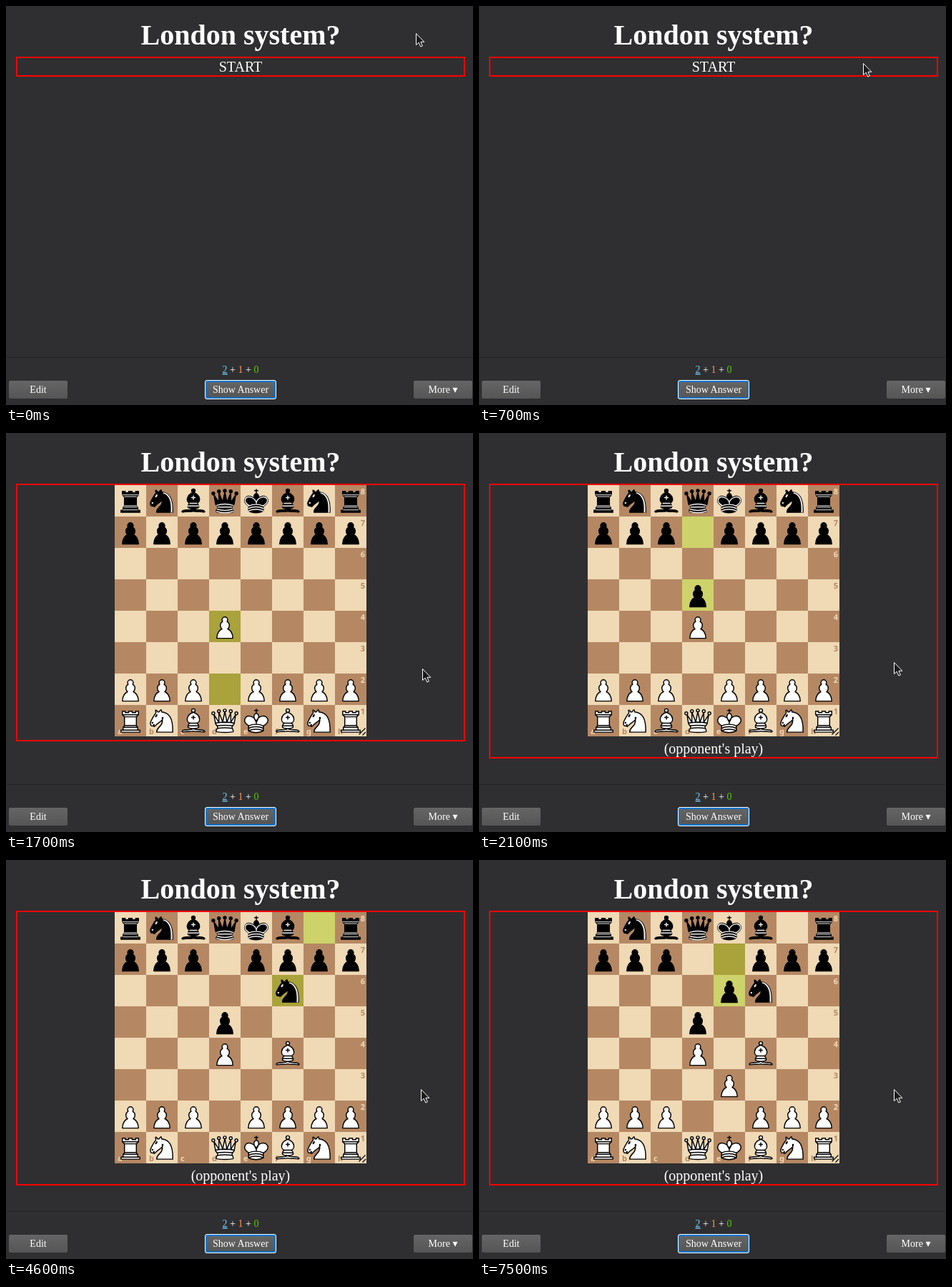
An HTML page that plays this animation: 653x559 px, repeating every 8 s.

```html
<!DOCTYPE html>
<html lang="en">
<head>
<meta charset="utf-8">
<title>Opening flashcard</title>
<style>
  html, body { margin: 0; width: 100%; height: 100%; overflow: hidden; background: #2f2f31; }
  svg { display: block; }
  text { font-family: "Liberation Serif", "DejaVu Sans", serif; fill: #fff; text-anchor: middle; white-space: pre; }
  .title { font-size: 40px; font-weight: bold; }
  .body { font-size: 20px; }
  .small { font-size: 14px; }
  .coord { font: bold 11px "Noto Sans", sans-serif; }
  .piece { stroke: #000; stroke-width: 1.5; stroke-linecap: round; stroke-linejoin: round; }
</style>
</head>
<body>
<svg id="stage" width="653" height="559" viewBox="0 0 653 559">
  <defs>
    <linearGradient id="face" x1="0" y1="0" x2="0" y2="1">
      <stop offset="0" stop-color="#656565"/><stop offset="1" stop-color="#555"/>
    </linearGradient>
  </defs>
  <rect width="653" height="559" fill="#2f2f31"/>
  <text class="title" x="328" y="54">London system?</text>
  <text class="body" id="start" x="328" y="92">START</text>
  <g id="board"></g>
  <text class="body" id="caption" x="328" y="449">(opponent's play)</text>
  <rect id="box" x="15" y="72" width="626" height="26" fill="none" stroke="#f00" stroke-width="2"/>

  <rect y="492" width="653" height="1" fill="#252527"/>
  <text class="small" x="328" y="514"><tspan fill="#7cf" text-decoration="underline">2</tspan> + <tspan fill="#ff935b">1</tspan> + <tspan fill="#5c0">0</tspan></text>
  <g fill="url(#face)">
    <rect x="4" y="525" width="82" height="25" rx="2"/>
    <rect x="570" y="525" width="82" height="25" rx="2"/>
    <rect x="278" y="524" width="100" height="27" rx="3.5" fill="#fff"/>
    <rect x="279" y="525" width="98" height="25" rx="2.5" fill="#0b75d1"/>
    <rect x="281" y="527" width="94" height="21" rx="1"/>
  </g>
  <text class="small" x="45" y="542">Edit</text>
  <text class="small" x="328" y="542">Show Answer</text>
  <text class="small" x="611" y="542">More ▾</text>
  <path id="cursor" d="M.5 .5V16.5L4.2 13.2L6.8 19L9.4 17.9L6.9 12.3H11.8Z" fill="#1a1a1b" stroke="#fff" stroke-linejoin="round"/>
</svg>
<script>
const LOOP = 8000, TICK = 100, SQ = 44, LEFT = 152, TOP = 73;
const LIGHT = '#f0d9b5', DARK = '#b58863', PALE = '#ececec';
const FILES = 'abcdefgh';

// [time, from, to]; every second move is the opponent's
const MOVES = [
  [800, 'd2', 'd4'], [2100, 'd7', 'd5'], [3300, 'c1', 'f4'],
  [4600, 'g8', 'f6'], [5800, 'e2', 'e3'], [7500, 'e7', 'e6']
];
// [time, x, y]
const POINTER = [
  [0, 573, 38], [700, 537, 80], [1300, 537, 80], [1400, 572, 250],
  [1500, 587, 350], [1600, 587, 350], [1700, 582, 330], [1800, 580, 321]
];

const $ = id => document.getElementById(id);
const fileOf = sq => FILES.indexOf(sq[0]);
const xOf = sq => LEFT + fileOf(sq) * SQ;
const yOf = sq => TOP + (8 - sq[1]) * SQ;
const isDark = sq => (fileOf(sq) + +sq[1]) % 2 === 1;

function add(parent, tag, attrs, text = '') {
  const el = document.createElementNS('http://www.w3.org/2000/svg', tag);
  for (const k in attrs) el.setAttribute(k, attrs[k]);
  el.textContent = text;
  return parent.appendChild(el);
}

const dots = (r, list) => list.map(([x, y]) =>
  `M${x - r} ${y}a${r} ${r} 0 1 1 ${2 * r} 0a${r} ${r} 0 1 1 ${-2 * r} 0z`).join('');

// Piece outlines on a 45-unit square
const PAWN = 'M22.5 9c-2.21 0-4 1.79-4 4 0 .89.29 1.71.78 2.38C17.33 16.5 16 18.59 16 21c0 2.03.94 3.84 2.41 5.03-3 1.06-7.41 5.55-7.41 13.47h23c0-7.92-4.41-12.41-7.41-13.47 1.47-1.19 2.41-3 2.41-5.03 0-2.41-1.33-4.5-3.28-5.62.49-.67.78-1.49.78-2.38 0-2.21-1.79-4-4-4z';
const ROOK = 'M9 39h27v-3H9zM12 36v-4h21v4zM12.5 32l1.5-2.5h17l1.5 2.5zM14 29.5V17h17v12.5zM14 17l-3-3h23l-3 3zM11 14V9h4v2h5V9h5v2h5V9h4v5z';
const KNIGHT = 'M22 10c10.5 1 16.5 8 16 29H15c0-9 10-6.5 8-21M24 18c.38 2.91-5.55 7.37-8 9-3 2-2.82 4.34-5 4-1.04-.94 1.41-3.04 0-3-1 0 .19 1.23-1 2-1 0-4 1-4-4 0-2 6-12 6-12s1.89-1.9 2-3.5c-.73-1-.5-2-.5-3 1-1 3 2.5 3 2.5h2s.78-2 2.5-3c1 0 1 3 1 3';
const EYES = dots(.5, [[9, 25.5]]) + 'M14.93 15.75a.5 1.5 30 1 1-.86-.5.5 1.5 30 1 1 .86.5z';
const MANE = 'M24.55 10.4l-.45 1.45.5.15c3.15 1 5.65 2.49 7.9 6.75S35.75 29.06 35.25 39l-.05.5h2.25l.05-.5c.5-10.06-.88-16.85-3.25-21.34-2.37-4.49-5.79-6.64-9.19-7.16z';
const BISHOP = 'M9 36c3.39-.97 10.11.43 13.5-2 3.39 2.43 10.11 1.03 13.5 2 0 0 1.65.54 3 2-.68.97-1.65.99-3 .5-3.39-.97-10.11.46-13.5-1-3.39 1.46-10.11.03-13.5 1-1.35.49-2.32.47-3-.5 1.35-1.94 3-2 3-2zM15 32c2.5 2.5 12.5 2.5 15 0 .5-1.5 0-2 0-2 0-2.5-2.5-4-2.5-4 5.5-1.5 6-11.5-5-15.5-11 4-10.5 14-5 15.5 0 0-2.5 1.5-2.5 4 0 0-.5.5 0 2z' + dots(2.5, [[22.5, 8]]);
const MITRE = 'M17.5 26h10M15 30h15M22.5 15.5v5M20 18h5';
const QUEEN = 'M9 26c8.5-1.5 21-1.5 27 0l2-12-7 11V11l-5.5 13.5-3-15-3 15-5.5-14V25L7 14zM9 26c0 2 1.5 2 2.5 4 1 1.5 1 1 .5 3.5-1.5 1-1.5 2.5-1.5 2.5-1.5 1.5.5 2.5.5 2.5 6.5 1 16.5 1 23 0 0 0 1.5-1 0-2.5 0 0 .5-1.5-1-2.5-.5-2.5-.5-2 .5-3.5 1-2 2.5-2 2.5-4-8.5-1.5-18.5-1.5-27 0z' + dots(2, [[6, 12], [14, 9], [22.5, 8], [31, 9], [39, 12]]);
const KING = 'M22.5 11.63V6M20 8h5M22.5 25s4.5-7.5 3-10.5c0 0-1-2.5-3-2.5s-3 2.5-3 2.5c-1.5 3 3 10.5 3 10.5M11.5 37c5.5 3.5 15.5 3.5 21 0v-7s9-4.5 6-10.5c-4-6.5-13.5-3.5-16 4V27v-3.5c-3.5-7.5-13-10.5-16-4-3 6 5 10 5 10z';
const FOLDS = 'M11.5 30c5.5-3 15.5-3 21 0m-21 3.5c5.5-3 15.5-3 21 0m-21 3.5c5.5-3 15.5-3 21 0';

// type: [outline, lines on white, lines on black, solid details on white, on black]
const SHAPES = {
  p: [PAWN],
  r: [ROOK, '', 'M12 35.5h21M13 31.5h19M14 29.5h17M14 16.5h17M11 14h23'],
  n: [KNIGHT, EYES, EYES, EYES, EYES + MANE],
  b: [BISHOP, MITRE, MITRE],
  q: [QUEEN, 'M11.5 30c3.5-1 18.5-1 22 0M12 33.5c6-1 15-1 21 0',
    'M11 29a35 35 0 0 1 23 0M12.5 31.5h20M11.5 34.5a35 35 0 0 0 22 0M10.5 37.5a35 35 0 0 0 24 0'],
  k: [KING, FOLDS, FOLDS + 'M32 29.5s8.5-4 6.03-9.65C34.15 14 25 18 22.5 24.5v2.1-2.1C20 18 9.9 14 7 19.85c-2.5 5.65 4.85 9 4.85 9']
};

const board = $('board');
const squares = {}, pieces = [];

for (let rank = 8; rank; rank--) for (const file of FILES) {
  const sq = file + rank;
  squares[sq] = add(board, 'rect', { x: xOf(sq), y: yOf(sq), width: SQ, height: SQ });
}
for (let i = 0; i < 8; i++) {
  const edge = 'h' + (i + 1), base = FILES[i] + 1;
  const ink = sq => `fill:${isDark(sq) ? LIGHT : DARK};text-anchor:`;
  add(board, 'text', { class: 'coord', x: 502, y: yOf(edge) + 13, style: ink(edge) + 'end' }, edge[1]);
  add(board, 'text', { class: 'coord', x: xOf(base) + 4, y: 422, style: ink(base) + 'start' }, base[0]);
}

function addPiece(type, black, home) {
  const el = add(board, 'g', { class: 'piece' });
  const [outline, onWhite, onBlack, solidWhite, solidBlack] = SHAPES[type];
  const lines = black ? onBlack : onWhite, solid = black ? solidBlack : solidWhite;
  const ink = black ? PALE : '#000';
  add(el, 'path', { d: outline, fill: black ? '#000' : '#fff' });
  if (lines) add(el, 'path', { d: lines, fill: 'none', stroke: ink, 'stroke-width': black && type === 'r' ? 1 : 1.5 });
  if (solid) add(el, 'path', { d: solid, fill: ink, stroke: 'none' });
  pieces.push({ el, home });
}
[...'rnbqkbnr'].forEach((type, i) => {
  addPiece(type, true, FILES[i] + 8);
  addPiece('p', true, FILES[i] + 7);
  addPiece('p', false, FILES[i] + 2);
  addPiece(type, false, FILES[i] + 1);
});
add(board, 'path', { d: 'M493.5 422.5l9-9M498.5 423.5l4.5-4.5', stroke: '#000', 'stroke-width': 1.2 });

function pointerAt(t) {
  const next = POINTER.findIndex(p => p[0] > t);
  if (next < 0) return POINTER[POINTER.length - 1].slice(1);
  const [t0, x0, y0] = POINTER[next - 1], [t1, x1, y1] = POINTER[next];
  const u = (t - t0) / (t1 - t0), e = u * u * (3 - 2 * u);
  return [x0 + (x1 - x0) * e, y0 + (y1 - y0) * e].map(Math.round);
}

function showPosition(count) {
  const last = MOVES[count - 1] || [];
  const reply = count > 0 && count % 2 === 0;
  board.style.display = count ? '' : 'none';
  $('start').style.display = count ? 'none' : '';
  $('caption').style.display = reply ? '' : 'none';
  $('box').setAttribute('height', count ? (reply ? 383 : 359) : 26);
  for (const sq in squares) {
    const lit = last.includes(sq), dark = isDark(sq);
    squares[sq].setAttribute('fill', lit ? (dark ? '#aaa23b' : '#cdd26a') : (dark ? DARK : LIGHT));
  }
  for (const { el, home } of pieces) {
    let at = home;
    for (const [, from, to] of MOVES.slice(0, count)) if (at === from) at = to;
    el.setAttribute('transform', `translate(${xOf(at)} ${yOf(at)}) scale(${SQ / 45})`);
  }
}

let shown = -1;
function draw() {
  const t = Math.floor(performance.now() % LOOP / TICK) * TICK;
  const count = MOVES.filter(m => m[0] <= t).length;
  if (count !== shown) showPosition(shown = count);
  $('cursor').setAttribute('transform', `translate(${pointerAt(t)})`);
  requestAnimationFrame(draw);
}
draw();
</script>
</body>
</html>
```
